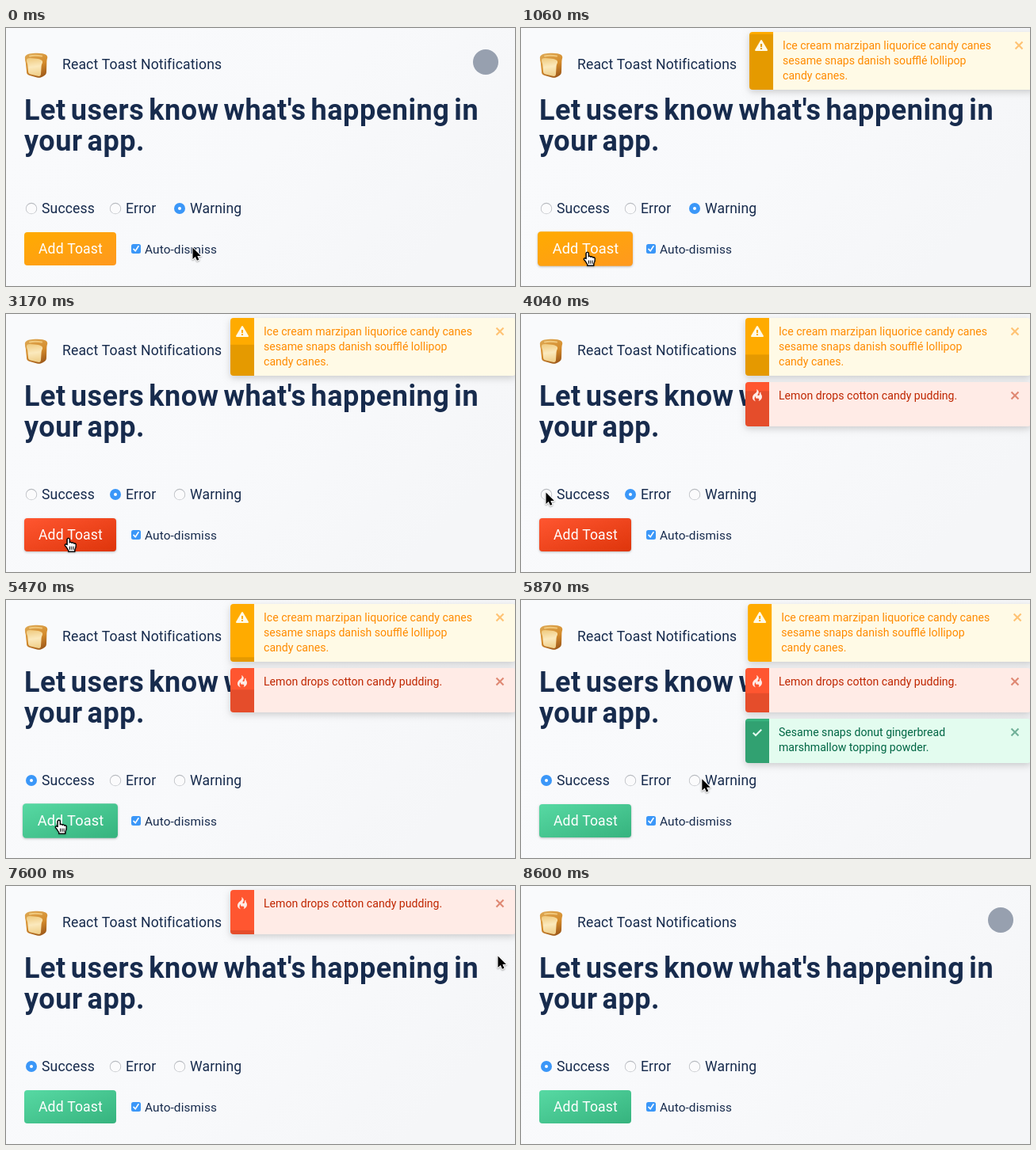
These frames come from a looping animation (642 by 326 pixels, 9.91 s). An HTML page with a canvas:

```html
<!DOCTYPE html>
<html lang="en">
<head>
<meta charset="utf-8">
<title>React Toast Notifications</title>
<style>
html, body { margin: 0; width: 100%; height: 100%; overflow: hidden; background: #f9fafc; }
canvas { display: block; width: 642px; height: 326px; }
</style>
</head>
<body>
<canvas id="stage" width="642" height="326"></canvas>
<script>
const ctx = document.getElementById('stage').getContext('2d');
const LOOP = 9910, LIFE = 5000, SLIDE = 220, GAP = 8;
const NAVY = '#172b4d', BLUE = '#3b97f8';

const ICONS = {
  alert: new Path2D('M8.9 1.5a1 1 0 0 0-1.8 0L.14 13.5a1 1 0 0 0 .88 1.5h13.97a1 1 0 0 0 .88-1.5zM9.03 13H7v-2h2.03zM9.03 10H7V6h2.03z'),
  flame: new Path2D('M5.05 0c.81 2.17.41 3.38-.52 4.31C3.55 5.37 1.98 6.15.9 7.68c-1.45 2.05-1.7 6.53 3.53 7.7-2.2-1.16-2.67-4.52-.3-6.61-.61 2.03.53 3.33 1.94 2.86 1.39-.47 2.3.53 2.27 1.6-.02.78-.31 1.44-1.13 1.81 3.42-.59 4.78-3.42 4.78-5.56 0-2.84-2.53-3.22-1.25-5.61-1.52.13-2.03 1.13-1.89 2.75.09 1.08-1.02 1.8-1.86 1.33-.67-.41-.66-1.19-.06-1.78C8.18 5 8.68 2.15 5.05 0z'),
  check: new Path2D('M12 5.5l-8 8-4-4L1.5 8 4 10.5 10.5 4z'),
  close: new Path2D('M7.48 8l3.75 3.75-1.48 1.48L6 9.48l-3.75 3.75-1.48-1.48L4.52 8 .77 4.25l1.48-1.48L6 6.52l3.75-3.75 1.48 1.48z')
};
const ARROW = new Path2D('M.5.5V15l3.3-3.1 2.1 4.9 2.5-1-2.1-4.8h4.6z');
const HAND = new Path2D('M-1.8 8.6V1.7C-1.8-.2 1.2-.2 1.2 1.7V6c.3-1 2.6-.9 2.8.5.5-.9 2.6-.7 2.7.7 1-.6 2.5 0 2.5 1.4 0 3.2-.2 4.6-1.5 6.4v2.2H-.2v-1.7C-1.5 13.8-2.4 11.8-4 10.2c-1.7-1.8.2-3 2.2-1.6z');
const LOAF = new Path2D('M24 39C23 34 28 32.500 34 32c4-.5 8-.5 12 .2 5 .8 7 3.300 6 6.300-.5 2-.7 3-.7 6L51 55c0 3-1 4-4 6-3 2-5 2-8 1.400l-9-2.400c-3-1-4-2-4-5l-1-9c0-3-1-4-1-7z');
const SLICE = new Path2D('M26 40.500c0-3 4-3 10-2 7 .5 11 2 10 5.500-1 2-1.500 3-1.500 6l-.5 8c0 3-2 3.500-5 2.500l-8-2c-2-.8-3-1.500-3-4l-.7-8c0-2-1.300-3-1.300-6z');

const KINDS = {
  success: { icon: 'check', fill: '#36b37e', bg: '#e3fcef', ink: '#006644', from: '#57d9a3', to: '#36b37e' },
  error: { icon: 'flame', fill: '#ff5630', bg: '#ffebe6', ink: '#bf2600', from: '#ff5630', to: '#de350b' },
  warning: { icon: 'alert', fill: '#ffab00', bg: '#fffae6', ink: '#ff8b00', from: '#ffab00', to: '#ff991f' }
};

const TOASTS = [
  { kind: KINDS.warning, h: 73, enter: 880, count: 865, exit: 5865,
    lines: ['Ice cream marzipan liquorice candy canes', 'sesame snaps danish soufflé lollipop', 'candy canes.'] },
  { kind: KINDS.error, h: 56, enter: 3190, count: 3040, exit: 7983,
    lines: ['Lemon drops cotton candy pudding.'] },
  { kind: KINDS.success, h: 56, enter: 5590, count: 5590, exit: 7070,
    lines: ['Sesame snaps donut gingerbread', 'marshmallow topping powder.'] }
];

// time, x, y of the pointer tip
const PATH = [
  [50, 235, 277], [420, 84, 283], [1080, 84, 283], [1600, 135, 229], [2150, 135, 229],
  [2650, 79, 283], [3380, 79, 283], [3880, 31, 225], [4330, 31, 225], [4850, 67, 278],
  [5600, 67, 278], [6350, 608, 102], [6640, 608, 102], [6900, 620, 88], [8500, 620, 88], [8540, 632, 89]
];
const HOVERS = [[240, 1180], [2450, 3520], [4660, 5740]];
const PRESSES = [[810, 870], [3040, 3180], [5510, 5580]];

const clamp = v => Math.max(0, Math.min(1, v));
const smooth = u => u * u * (3 - 2 * u);

function bezier(x1, y1, x2, y2) {
  const at = (a, b, s) => 3 * a * s * (1 - s) ** 2 + 3 * b * s * s * (1 - s) + s ** 3;
  return x => {
    if (x <= 0 || x >= 1) return clamp(x);
    let lo = 0, hi = 1;
    for (let i = 0; i < 24; i++) {
      const mid = (lo + hi) / 2;
      if (at(x1, x2, mid) < x) lo = mid; else hi = mid;
    }
    return at(y1, y2, lo);
  };
}
const swift = bezier(0.2, 0, 0, 1);
const ease = bezier(0.25, 0.1, 0.25, 1);

// rises to 1 at the start of a span, falls back at its end
const pulse = (spans, t, ramp) =>
  spans.reduce((sum, [a, b]) => sum + clamp((t - a) / ramp) - clamp((t - b) / ramp), 0);

function text(str, x, y, size, color, tracking = 0) {
  ctx.font = `400 ${size}px Roboto, sans-serif`;
  ctx.letterSpacing = `${tracking}px`;
  ctx.fillStyle = color;
  ctx.fillText(str, x, y);
}

const label = (str, x, y, color = NAVY) => text(str, x, y, 17.6, color, 0.12);

function heading(lines, x, y) {
  ctx.save();
  ctx.font = '700 36px Roboto, sans-serif';
  ctx.letterSpacing = '0.55px';
  ctx.wordSpacing = '-3.6px';
  ctx.fillStyle = NAVY;
  lines.forEach((line, i) => ctx.fillText(line, x, y + 39 * i));
  ctx.restore();
}

function box(x, y, w, h, r, fill) {
  ctx.beginPath();
  ctx.roundRect(x, y, w, h, r);
  ctx.fillStyle = fill;
  ctx.fill();
}

function disc(x, y, r, fill) {
  ctx.beginPath();
  ctx.arc(x, y, r, 0, Math.PI * 2);
  ctx.fillStyle = fill;
  ctx.fill();
}

function shadow(alpha, dy, blur) {
  ctx.shadowColor = `rgba(0,0,0,${alpha})`;
  ctx.shadowOffsetY = dy;
  ctx.shadowBlur = blur;
}

function gradient(x0, y0, x1, y1, ...colors) {
  const g = ctx.createLinearGradient(x0, y0, x1, y1);
  colors.forEach((c, i) => g.addColorStop(i / (colors.length - 1), c));
  return g;
}

function icon(name, x, y, color) {
  ctx.save();
  ctx.translate(x, y);
  ctx.fillStyle = color;
  ctx.fill(ICONS[name], 'evenodd');
  ctx.restore();
}

function drawBread() {
  ctx.fillStyle = gradient(32, 32, 46, 63, '#dca550', '#d58c2c', '#9a5518');
  ctx.fill(LOAF);
  ctx.fillStyle = gradient(33, 38, 36, 60, '#f0cb80', '#fbe9bd', '#f0d08c');
  ctx.fill(SLICE);
  ctx.lineCap = 'round';
  ctx.lineWidth = 2;
  ctx.strokeStyle = 'rgba(255,228,160,0.6)';
  ctx.stroke(new Path2D('M30 35.500q6-1.500 15 0'));
}

function drawPage() {
  ctx.fillStyle = gradient(150, 0, 500, 326, '#f9fafc', '#f8f9fb', '#f5f6f8');
  ctx.fillRect(0, 0, 642, 326);
  drawBread();
  label('React Toast Notifications', 71, 52);
  disc(605, 43, 16, '#97a0af');
  heading(["Let users know what's happening in", 'your app.'], 23, 116);
}

function drawRadios(chosen) {
  [['Success', 32], ['Error', 138], ['Warning', 219]].forEach(([name, x], i) => {
    if (i === chosen) {
      disc(x, 228, 7, BLUE);
      disc(x, 228, 2, '#fff');
    } else {
      disc(x, 228, 7.2, '#b9bcc1');
      disc(x, 228.2, 6.3, '#fbfbfc');
    }
    label(name, x + 13, 234);
  });
}

function drawCheckbox() {
  box(158, 273, 12, 12, 2.5, BLUE);
  ctx.beginPath();
  ctx.moveTo(161, 279.4);
  ctx.lineTo(163.2, 281.8);
  ctx.lineTo(167, 275.8);
  ctx.strokeStyle = '#fff';
  ctx.lineWidth = 1.6;
  ctx.stroke();
  text('Auto-dismiss', 175, 285, 15.4, NAVY, 0.1);
}

function drawButton(t, kind) {
  const hover = pulse(HOVERS, t, 100);
  const press = pulse(PRESSES, t, 50);
  const focus = t >= 820 && t < 7030 ? 1 : 0;
  const scale = 1 + 0.034 * hover * (1 - press);
  ctx.save();
  ctx.translate(81, 279);
  ctx.scale(scale, scale);
  shadow(0.25 * Math.max(hover, focus), 1, 3);
  box(-58, -21, 116, 42, 4, gradient(-13.5, -37, 13.5, 37, kind.from, kind.to));
  shadow(0, 0, 0);
  label('Add Toast', -40, 6, '#fff');
  ctx.restore();
}

function drawToast(toast, t, y) {
  const { kind, h, lines } = toast;
  const out = 1 - swift((t - toast.enter) / SLIDE) + swift((t - toast.exit) / SLIDE);
  if (out >= 1) return;
  const left = clamp(1 - (t - toast.count) / LIFE);
  ctx.save();
  ctx.translate(283 + 432 * out, y);
  shadow(0.175, 3, 8);
  box(0, 0, 360, h, 4, kind.bg);
  shadow(0, 0, 0);
  box(0, 0, 30, h, [4, 0, 0, 4], kind.fill);
  box(0, h * (1 - left), 30, h * left, [0, 0, 0, 4], 'rgba(0,0,0,0.1)');
  icon(kind.icon, kind.icon === 'alert' ? 7 : 9, 9, kind.bg);
  lines.forEach((line, i) => text(line, 42, 22 + 19.2 * i, 14.1, kind.ink));
  ctx.globalAlpha = 0.5;
  icon('close', 334, 9, kind.ink);
  ctx.restore();
}

function drawToasts(t) {
  let y = 5;
  for (const toast of TOASTS) {
    if (t < toast.enter) continue;
    drawToast(toast, t, y);
    y += (toast.h + GAP) * (1 - ease((t - toast.exit - 100) / (SLIDE - 100)));
  }
}

function pointerAt(t) {
  const i = PATH.findIndex(p => p[0] > t);
  if (i === 0) return PATH[0].slice(1);
  if (i < 0) return PATH[PATH.length - 1].slice(1);
  const [t0, x0, y0] = PATH[i - 1], [t1, x1, y1] = PATH[i];
  const u = smooth((t - t0) / (t1 - t0));
  return [x0 + (x1 - x0) * u, y0 + (y1 - y0) * u];
}

function drawPointer(t) {
  if (t >= 8590) return;
  const [x, y] = pointerAt(t);
  const onButton = x > 23 && x < 139 && y > 258 && y < 300;
  const onClose = t > 6300 && t < 7100;
  const hand = onButton || onClose;
  const shape = hand ? HAND : ARROW;
  ctx.save();
  ctx.translate(x, y);
  ctx.lineJoin = 'round';
  shadow(0.35, 1, 2);
  ctx.lineWidth = hand ? 1.2 : 2;
  ctx.strokeStyle = hand ? '#000' : '#fff';
  ctx.fillStyle = hand ? '#fff' : '#000';
  ctx.stroke(shape);
  shadow(0, 0, 0);
  ctx.fill(shape);
  if (hand) {
    ctx.stroke(shape);
    ctx.lineWidth = 1;
    ctx.stroke(new Path2D('M1.5 11v3.5M3.8 11v3.5M6.1 11v3.5'));
  }
  ctx.restore();
}

function draw(t) {
  const chosen = t < 1900 ? 2 : t < 4150 ? 1 : 0;
  drawPage();
  drawRadios(chosen);
  drawButton(t, [KINDS.success, KINDS.error, KINDS.warning][chosen]);
  drawCheckbox();
  drawToasts(t);
  drawPointer(t);
}

const start = performance.now();
function tick() {
  draw((performance.now() - start) % LOOP);
  requestAnimationFrame(tick);
}
tick();
</script>
</body>
</html>
```
